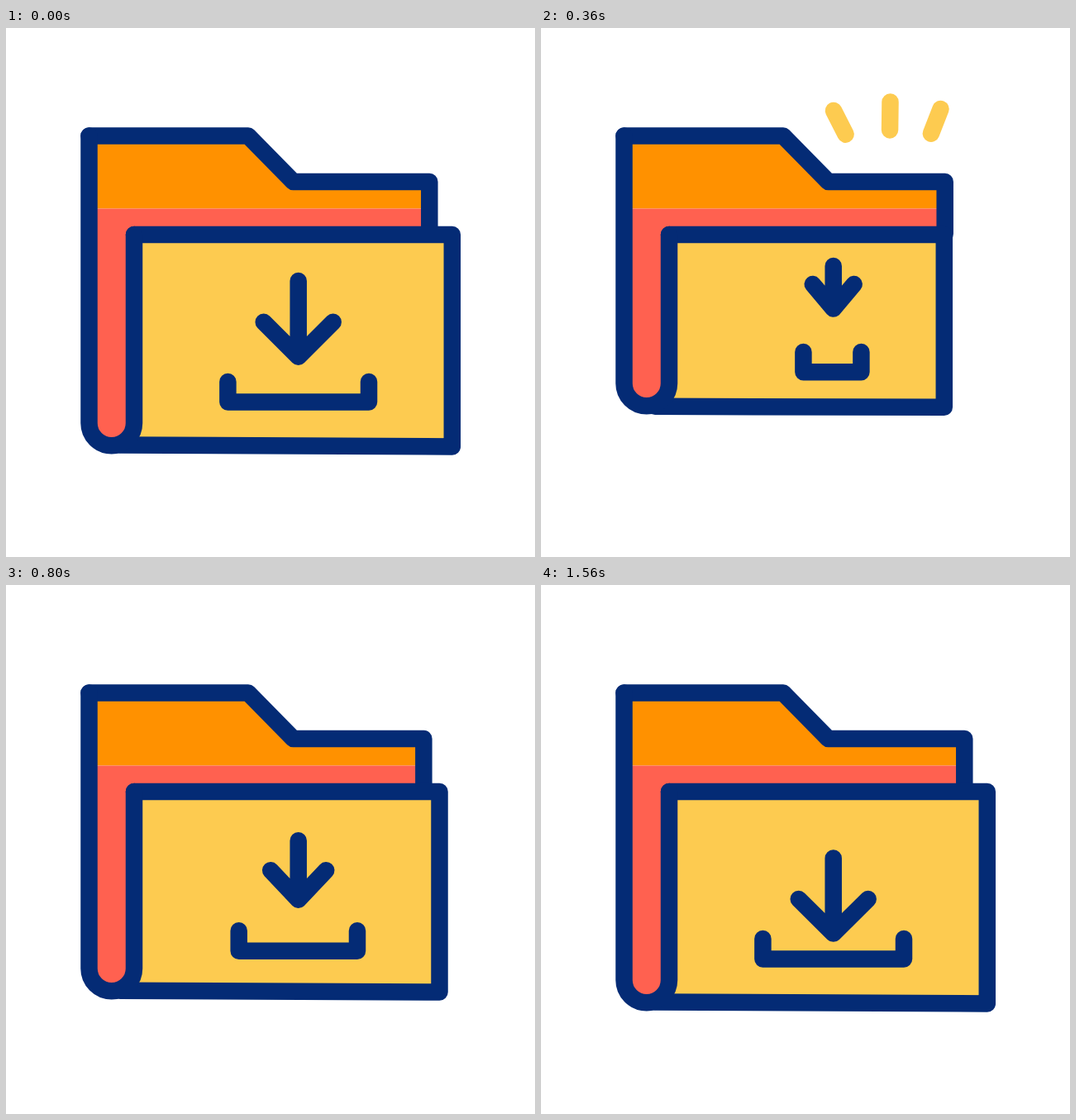
Write an HTML page that moves like this. It is 640 by 640 pixels and loops after 2400 ms.

```html
<!DOCTYPE html>
<html lang="en">
<head>
<meta charset="utf-8">
<title>Download folder</title>
<style>
  html, body { margin: 0; width: 100%; height: 100%; overflow: hidden; background: #fff; }
  svg { display: block; width: 100vw; height: 100vh; }
  .line { fill: none; stroke-width: 20.5; stroke-linecap: round; stroke-linejoin: round; }
  .navy { stroke: #042b75; }
  .gold { stroke: #fdcb50; }
  .coral { stroke: #ff6150; }
</style>
</head>
<body>
<svg viewBox="0 0 640 640">
  <path id="tab" fill="#ff9100"/>
  <path id="inside" fill="#ff6150"/>
  <path id="backLine" class="line navy"/>
  <path id="panel" fill="#fdcb50"/>
  <path id="panelLine" class="line navy"/>
  <path id="foldLine" class="line navy"/>
  <path id="sparks" class="line coral"/>
  <path id="tray" class="line navy"/>
  <path id="arrow" class="line navy"/>
  <path id="rays" class="line gold"/>
</svg>
<script>
const LOOP = 2400;

// Rays run from the inner end (x1, y1) to the outer end (x2, y2).
const RAYS = [[383.5, 158, 354, 100], [421.6, 158, 422.5, 89.5], [460, 158, 483.5, 98]];
const SPARKS = [[277, 378, 250.7, 343], [428, 378, 454.3, 343]];

// Arrow poses: top of shaft, height of the barbs, tip, half width.
const RAISED = [306, 355.7, 397.8, 42];
const SMALL = [288, 310, 339.6, 25];
const LOWERED = [330.5, 380, 421.6, 42];

const clamp = x => Math.min(1, Math.max(0, x));
const span = (t, a, b) => clamp((t - a) / (b - a));
const ease = (t, a, b) => { const x = span(t, a, b); return x * x * (3 - 2 * x); };
const mix = (a, b, k) => a + (b - a) * k;
const blend = (a, b, k) => a.map((v, i) => mix(v, b[i], k));
const draw = (id, d) => document.getElementById(id).setAttribute('d', d);

function drawFolder(k) {
  const back = mix(512.3, 488.7, k);
  const right = mix(539.8, 487.8, k);
  const bend = mix(478, 430, k);
  const left = mix(504.5, 457.8, k);
  const low = mix(506.5, 458.8, k);
  const edge = `M100.5 130.5H293L347.5 186H${back}`;
  const fold = `V${bend}A27.25 27.25 0 0 1 100.5 ${bend}`;

  draw('tab', `${edge}V218.5H100.5Z`);
  draw('inside', `M100.5 218.5H${back}V250H155${fold}Z`);
  draw('backLine', `${edge}V249`);
  draw('panel', `M155 250H${right}V${low}L150 ${left}L155 ${bend}Z`);
  draw('panelLine', `M155 250H${right}V${low}L138 ${left}`);
  draw('foldLine', `M155 250${fold}V130.5`);
}

function drawTray(k) {
  const top = mix(428, 392, k);
  const low = mix(452.5, 416.3, k);
  draw('tray', `M${mix(268.4, 317.4, k)} ${top}V${low}H${mix(439, 387.4, k)}V${top}`);
}

function drawArrow([top, barb, tip, half]) {
  const x = 353.7;
  draw('arrow', `M${x} ${top}V${tip}M${x - half} ${barb}L${x} ${tip}L${x + half} ${barb}`);
}

function drawBurst(id, lines, head, tail) {
  const part = ([x1, y1, x2, y2]) =>
    `M${mix(x1, x2, tail)} ${mix(y1, y2, tail)}L${mix(x1, x2, head)} ${mix(y1, y2, head)}`;
  draw(id, head - tail > 0.002 ? lines.map(part).join('') : '');
}

function arrowPose(t) {
  if (t < 360) return blend(RAISED, SMALL, ease(t, 0, 260));
  if (t < 933) return blend(SMALL, LOWERED, Math.pow(span(t, 360, 933), 2.63));
  if (t < 1150) return blend(LOWERED, RAISED, ease(t, 933, 1150));
  return blend(RAISED, LOWERED, ease(t, 1150, 1560));
}

function render(t) {
  const shrink = ease(t, 0, 260);
  drawFolder(shrink - ease(t, 360, 1048));
  drawTray(shrink - ease(t, 513, 951));
  drawArrow(arrowPose(t));
  drawBurst('rays', RAYS, ease(t, 67, 282), ease(t, 220, 500));
  drawBurst('sparks', SPARKS, ease(t, 923, 1137), ease(t, 1040, 1340));
}

const start = performance.now();
function tick() {
  render((performance.now() - start) % LOOP);
  requestAnimationFrame(tick);
}
render(0);
requestAnimationFrame(tick);
</script>
</body>
</html>
```
